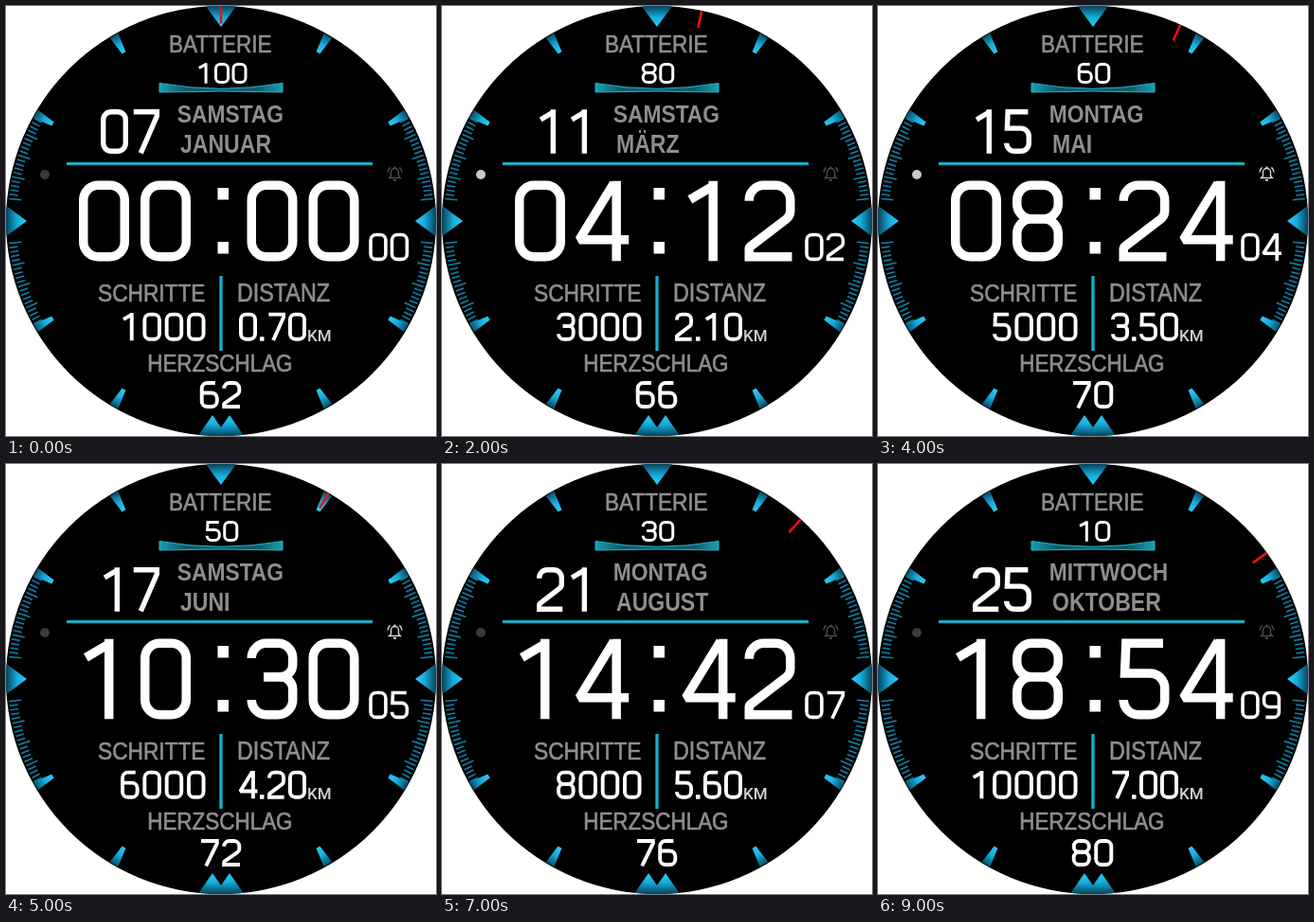
Recreate the animation shown at these times as an HTML page with a canvas. Size 454 by 454 pixels, loop 10000 ms.

```html
<!DOCTYPE html>
<html lang="de">
<head>
<meta charset="utf-8">
<title>Zifferblatt</title>
<style>
html, body { margin: 0; width: 100%; height: 100%; overflow: hidden; background: #fff; }
canvas { display: block; }
</style>
</head>
<body>
<canvas id="face" width="454" height="454"></canvas>
<script>
const ctx = document.getElementById('face').getContext('2d');
const C = 227;
const GRAY = '#8e8e92';
const CYAN = '#14d2ee';
const CONDENSED = 0.86;
const DAYS = ['SAMSTAG', 'DONNERSTAG', 'SAMSTAG', 'DONNERSTAG', 'MONTAG',
  'SAMSTAG', 'MITTWOCH', 'MONTAG', 'SAMSTAG', 'MITTWOCH'];
const MONTHS = ['JANUAR', 'FEBRUAR', 'MÄRZ', 'APRIL', 'MAI',
  'JUNI', 'JULI', 'AUGUST', 'SEPTEMBER', 'OKTOBER'];

// Digit strokes in a unit box: [x, y, corner radius]
const R = 0.36;
const ring = (top, bottom) =>
  [[.5, top], [1, top, R], [1, bottom, R], [0, bottom, R], [0, top, R], [.5, top]];
const stem = x => [[x, -.06], [x, 1.06]];
const six = [[.88, 0], [0, 0, R], [0, 1, R], [1, 1, R], [1, .42, R], [0, .42]];
const GLYPHS = [
  [ring(0, 1)],
  [[[.06, .2], [.62, .01]], stem(.62)],
  [[[0, .22], [0, 0, R], [1, 0, R], [1, .43, .25], [0, .87, .1], [0, 1], [1.04, 1]]],
  [[[0, .2], [0, 0, R], [1, 0, R], [1, .47, .3], [.3, .47]],
   [[.3, .47], [1, .47, .3], [1, 1, R], [0, 1, R], [0, .8]]],
  [[[.8, -.03], [-.04, .76], [1.16, .76]], stem(.86)],
  [[[.96, 0], [.06, 0], [.03, .42], [1, .42, R], [1, 1, R], [0, 1, R], [0, .82]]],
  [six],
  [[[-.04, 0], [1, 0], [1, .11], [.28, 1.05]]],
  [ring(0, .47), ring(.47, 1)],
  [six.map(([x, y, r]) => [1 - x, 1 - y, r])]
];

const two = n => String(n).padStart(2, '0');

function poly(points, fill) {
  ctx.beginPath();
  points.forEach(p => ctx.lineTo(...p));
  ctx.closePath();
  ctx.fillStyle = fill;
  ctx.fill();
}

function digit(d, x, y, s) {
  const w = s.w - s.line, h = s.h - s.line;
  const px = p => x + s.line / 2 + p[0] * w;
  const py = p => y + s.line / 2 + p[1] * h;
  for (const path of GLYPHS[d]) {
    ctx.beginPath();
    path.forEach((p, i) => {
      if (p[2]) {
        const next = path[i + 1];
        ctx.arcTo(px(p), py(p), px(next), py(next), p[2] * w);
      } else {
        ctx.lineTo(px(p), py(p));
      }
    });
    ctx.stroke();
  }
}

// align: 0 = left, .5 = centre, 1 = right
function number(text, x, y, s, align = 0) {
  ctx.strokeStyle = ctx.fillStyle = '#fff';
  ctx.lineWidth = s.line;
  ctx.miterLimit = 1.5;
  x -= align * ((text.length - 1) * s.step + s.w);
  for (const c of text) {
    if (c === '.') {
      ctx.fillRect(x, y + s.h - 4.5, 4.5, 4.5);
      x += 8;
    } else {
      digit(+c, x, y, s);
      x += s.step;
    }
  }
}

function label(text, x, y, size, weight = 400) {
  ctx.save();
  ctx.translate(x, y);
  ctx.scale(CONDENSED, 1);
  ctx.font = `${weight} ${size}px "Liberation Sans", Arial, sans-serif`;
  ctx.fillStyle = ctx.strokeStyle = GRAY;
  ctx.fillText(text, 0, 0);
  if (weight === 400) {
    ctx.lineWidth = 0.7;
    ctx.strokeText(text, 0, 0);
  }
  ctx.restore();
}

function atAngle(deg, draw) {
  ctx.save();
  ctx.translate(C, C);
  ctx.rotate(deg * Math.PI / 180);
  draw();
  ctx.restore();
}

function bezel() {
  const glow = ctx.createRadialGradient(0, 0, 204, 0, 0, 228);
  glow.addColorStop(0, '#2ad0fa');
  glow.addColorStop(.45, '#17addb');
  glow.addColorStop(1, '#053c55');

  for (let a = 0; a < 360; a += 30) {
    if (a % 90) atAngle(a, () => poly([[-5, -226], [5, -226], [2.2, -205], [-2.2, -205]], glow));
  }
  for (const side of [90, 270]) {
    for (let i = -24; i <= 24; i++) {
      if (Math.abs(i) < 5) continue;
      const len = i % 5 ? 9 : 13;
      atAngle(side + i * 1.2, () => {
        ctx.fillStyle = '#0f83ac';
        ctx.fillRect(-.75, -225, 1.5, len);
      });
    }
  }
  for (const a of [0, 90, 270]) {
    atAngle(a, () => poly([[-17, -228], [17, -228], [0, -205]], glow));
  }
  atAngle(180, () => {
    for (const x of [-9, 9]) poly([[x - 16, -228], [x + 16, -228], [x, -205]], glow);
  });
}

function dividers() {
  const across = ctx.createLinearGradient(0, 164, 0, 169);
  const down = ctx.createLinearGradient(224.5, 0, 229.5, 0);
  for (const g of [across, down]) {
    g.addColorStop(0, '#06363e');
    g.addColorStop(.5, CYAN);
    g.addColorStop(1, '#06363e');
  }
  ctx.fillStyle = across;
  ctx.fillRect(64, 164.5, 323, 4);
  ctx.fillStyle = down;
  ctx.fillRect(225, 285, 4, 79);

  const bar = ctx.createLinearGradient(162, 0, 292, 0);
  bar.addColorStop(0, '#1a9fb2');
  bar.addColorStop(.2, '#105c6b');
  bar.addColorStop(.8, '#105c6b');
  bar.addColorStop(1, '#1a9fb2');
  ctx.beginPath();
  ctx.moveTo(162, 81.5);
  ctx.quadraticCurveTo(227, 93, 292, 81.5);
  ctx.lineTo(292, 91);
  ctx.quadraticCurveTo(227, 89, 162, 91);
  ctx.closePath();
  ctx.fillStyle = bar;
  ctx.fill();
  ctx.strokeStyle = '#1fb9cf';
  ctx.lineWidth = 1;
  ctx.stroke();
}

function bell(color) {
  ctx.strokeStyle = ctx.fillStyle = color;
  ctx.lineWidth = 1.4;
  ctx.beginPath();
  ctx.moveTo(404.5, 181.5);
  ctx.lineTo(406.5, 179.5);
  ctx.lineTo(406.5, 176);
  ctx.arc(410.5, 175.5, 4, Math.PI, 0);
  ctx.lineTo(414.5, 179.5);
  ctx.lineTo(416.5, 181.5);
  ctx.closePath();
  ctx.stroke();
  ctx.fillRect(409.5, 169.5, 2, 2);
  ctx.fillRect(409, 183, 3, 1.8);
  ctx.beginPath();
  ctx.arc(410.5, 176, 7.5, Math.PI * 1.02, Math.PI * 1.27);
  ctx.stroke();
  ctx.beginPath();
  ctx.arc(410.5, 176, 7.5, -Math.PI * .27, -Math.PI * .02);
  ctx.stroke();
}

function status(linked, alarm) {
  ctx.fillStyle = linked ? '#c8c8c8' : '#3a3a3a';
  ctx.beginPath();
  ctx.arc(41, 178, 5, 0, Math.PI * 2);
  ctx.fill();
  bell(alarm ? '#d8d8d8' : '#4c4c4c');
}

const CLOCK = { w: 53, h: 85, line: 9.5, step: 65 };
const DATE = { w: 29, h: 47, line: 5.4, step: 33 };
const SECONDS = { w: 19.5, h: 29.5, line: 3.6, step: 22.5 };
const BATTERY = { w: 16, h: 22, line: 3, step: 18.5 };
const STEPS = { w: 19.5, h: 30, line: 3.9, step: 23.3 };
const DISTANCE = { w: 19, h: 30, line: 3.9, step: 22 };
const PULSE = { w: 20, h: 29, line: 3.9, step: 23.5 };

function draw(n) {
  ctx.fillStyle = '#fff';
  ctx.fillRect(0, 0, 454, 454);
  ctx.save();
  ctx.beginPath();
  ctx.arc(C, C, C, 0, Math.PI * 2);
  ctx.fillStyle = '#000';
  ctx.fill();
  ctx.clip();

  bezel();
  atAngle(n * 6, () => {
    ctx.fillStyle = '#f0100c';
    ctx.fillRect(-1.3, -226.5, 2.6, 18);
  });
  dividers();
  status(n >= 1 && n <= 4, n >= 3 && n <= 6);

  label('BATTERIE', 172, 49, 26.2);
  label(DAYS[n], 180.8, 122.5, 26.5, 700);
  label(MONTHS[n], 184, 154.5, 26.8, 700);
  label('SCHRITTE', 97, 311.5, 26.4);
  label('DISTANZ', 244, 311.5, 27.1);
  label('HERZSCHLAG', 149.2, 386, 26.1);
  ctx.font = '500 17px Roboto, sans-serif';
  ctx.fillStyle = '#d0d0d0';
  ctx.fillText('KM', 318, 353.5);

  number(String(100 - n * 10), 228, 60, BATTERY, .5);
  number(two(7 + n * 2), 100, 109, DATE);
  number(two(n * 2), 77, 184.5, CLOCK);
  number(two(n * 6), 254.5, 184.5, CLOCK);
  for (const y of [192, 249]) ctx.fillRect(223.5, y, 11.5, 12.5);
  number(two(n), 383.2, 239.7, SECONDS);
  number(String((n + 1) * 1000), 210.5, 323.7, STEPS, 1);
  number(((n + 1) * .7).toFixed(2), 246, 323.7, DISTANCE);
  number(String(62 + n * 2), 226.5, 396, PULSE, .5);
  ctx.restore();
}

const start = performance.now();
function tick() {
  draw(Math.floor((performance.now() - start) / 1000) % 10);
  requestAnimationFrame(tick);
}
tick();
</script>
</body>
</html>
```
